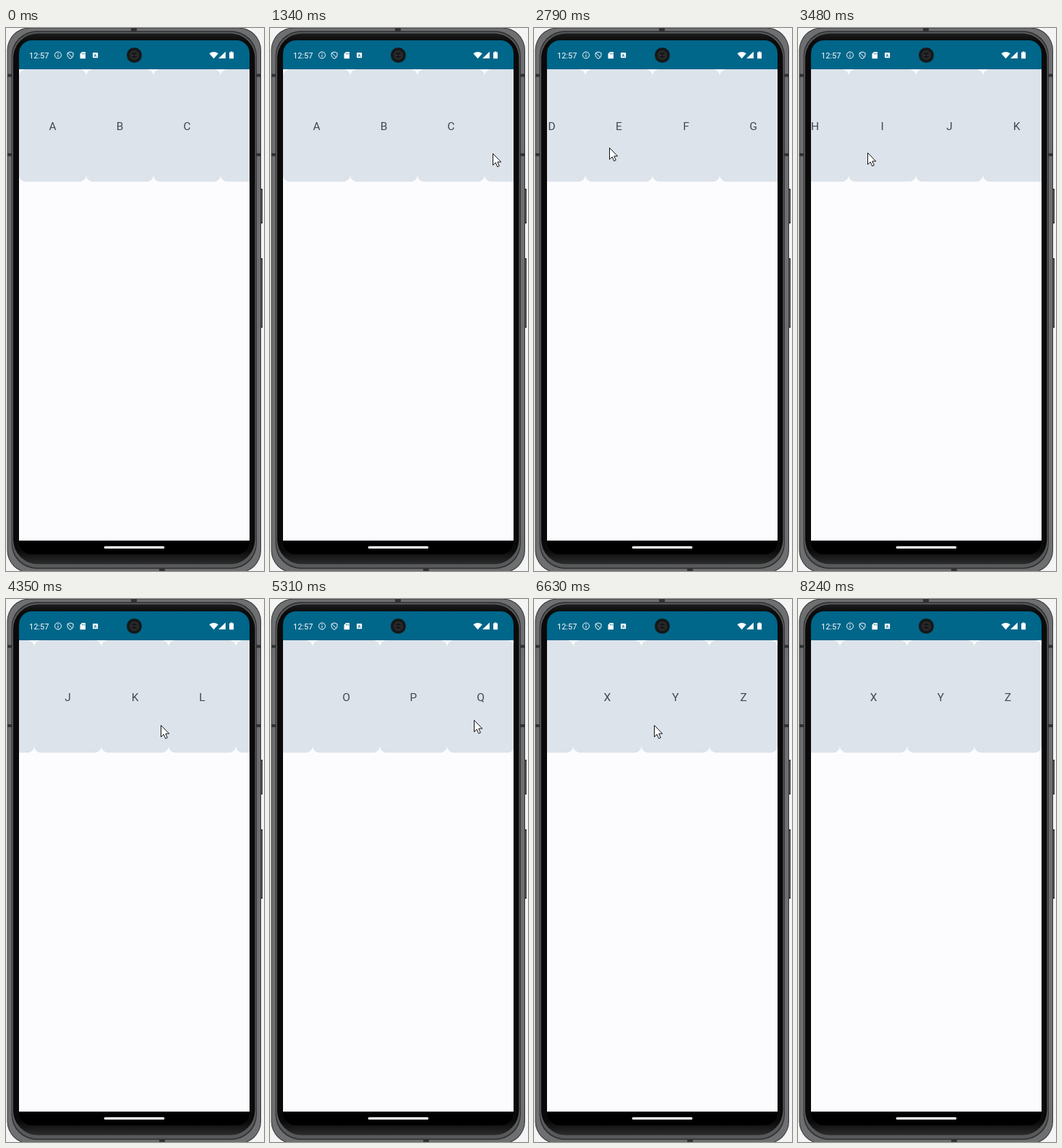
Animation, 357 px wide and 750 px high, one loop 9770 ms. Source, as an HTML page:

```html
<!DOCTYPE html>
<html lang="en">
<head>
<meta charset="utf-8">
<title>Letter carousel</title>
<style>
  html, body { margin: 0; width: 100%; height: 100%; overflow: hidden; background: #f4f4f4; }
  svg { display: block; width: 357px; height: 750px; }
  text { font-family: Roboto, sans-serif; }
  #cards rect { fill: #dce3ea; }
  #cards text { fill: #41484d; font-size: 15.5px; text-anchor: middle; }
</style>
</head>
<body>
<svg viewBox="0 0 357 750">
  <defs>
    <clipPath id="screen"><rect x="18" y="17" width="319" height="710" rx="18"/></clipPath>
    <linearGradient id="bezel" x2="0" y2="1">
      <stop offset="0" stop-color="#1c1c1c"/><stop offset=".015" stop-color="#0a0a0a"/>
      <stop offset=".975" stop-color="#0a0a0a"/><stop offset="1" stop-color="#2c2c2c"/>
    </linearGradient>
  </defs>

  <g id="phone">
    <path d="M352 222h3v48h-3zM352 318h3v96h-3z" fill="#353637"/>
    <path d="M353.5 224v44M353.5 320v92" stroke="#5b5c5d"/>
    <rect x="1.500" y="-.5" width="351.500" height="753" rx="31" fill="#333435"/>
    <rect x="2.500" y=".5" width="349.500" height="751" rx="30" fill="#6e6f70"/>
    <rect x="7.500" y="4" width="339.500" height="743" rx="35" fill="#303132"/>
    <rect x="8.500" y="5.500" width="337.500" height="740" rx="35" fill="#58595a"/>
    <rect x="10" y="7.500" width="334.500" height="733" rx="34" fill="url(#bezel)"/>
    <path d="M2 63.500h6v4h-6zM2 173h6v4h-6zM347 63.500h6v4h-6zM347 173h6v4h-6zM173 0h8v4h-8zM212 746h8v4h-8z" fill="#303132"/>
  </g>

  <g clip-path="url(#screen)">
    <path d="M18 17h319v710H18z"/>
    <path d="M18 57h319v651H18z" fill="#fcfcff"/>
    <g id="cards"></g>
    <path d="M18 17h319v40H18z" fill="#00668a"/>
    <rect x="135.700" y="715.700" width="83.600" height="3.400" rx="1.700" fill="#fff"/>
  </g>

  <g id="status" fill="#fff">
    <text x="32" y="41.500" font-size="11">12:57</text>
    <g fill="none" stroke="#fff">
      <circle cx="72" cy="37.500" r="4.500"/>
      <path d="M72 34.800v1.200M72 37v3.200"/>
      <path d="M89 33l4 1.500v3q0 3-4 5q-4-2-4-5v-3zM86 34.500l6 6.500"/>
    </g>
    <path d="M105 33h5v9.200h-7.500v-6.500z"/>
    <path d="M105.500 34.500v2M107.200 34.500v2M108.800 34.500v2" stroke="#00668a" stroke-width=".7"/>
    <rect x="120" y="34" width="7.200" height="7.200" rx=".7"/>
    <text x="123.600" y="39.900" font-size="6" font-weight="700" text-anchor="middle" fill="#00668a">A</text>
    <path d="M281.300 35.300q6.200-4.800 12.400 0L287.500 42.300z"/>
    <path d="M303.800 32.500v9.500h-9.800z"/>
    <path d="M309 33.500h1.700v-1h2.600v1h1.700v8.700h-6z"/>
  </g>

  <g id="camera">
    <circle cx="177.500" cy="37.500" r="10.500" fill="#161718"/>
    <circle cx="177.500" cy="37.500" r="6.500" fill="#2a2c2d"/>
    <circle cx="177.500" cy="37.500" r="4" fill="#17191a"/>
    <path d="M174.500 37.500h1.500M179 37.500h1.500" stroke="#5c6062"/>
  </g>

  <path id="cursor" d="M.5.500v16l3.700-3.500 2.500 5.700 2.600-1.100-2.500-5.600h4.900z" fill="#fff" stroke="#111"/>
</svg>

<script>
const LOOP = 9770, STEP = 60;
const LEFT = 18, RIGHT = 337, TOP = 57;
const CARD_W = 93, CARD_H = 155.2, RADIUS = 9.3;
const LETTERS = [...'ABCDEFGHIJKLMNOPQRSTUVWXYZ'];
const ROW_W = LETTERS.length * CARD_W;
const MAX_SCROLL = ROW_W - (RIGHT - LEFT);

const linear = u => u;
const drag = u => u ** 1.3;
const fling = u => 1 - (1 - u) ** 3;
const smooth = u => u * u * (3 - 2 * u);

// Rows: time, values, easing towards that row.
const scrollTrack = [
  [1800, [0]], [2100, [173], drag], [2790, [319], fling],
  [3040, [319]], [3270, [510], drag], [3960, [816], fling],
  [4700, [816]], [4920, [1010], drag], [5520, [1272], fling],
  [5700, [1470], drag], [6150, [1750], fling],
  [6190, [1750]], [6420, [1950], drag], [6540, [MAX_SCROLL], linear]
];
const stretchTrack = [
  [6540, [1]], [6600, [1.017], linear], [6630, [1.013], linear], [7140, [1], fling]
];
const cursorTrack = [
  [1160, [318, 179]], [1560, [291, 161], smooth],
  [1760, [291, 161]], [2100, [96, 161], drag], [2790, [104, 165], smooth],
  [3000, [296, 171], smooth], [3270, [95, 171], drag], [3840, [100, 174], smooth],
  [4350, [214, 174], drag], [4640, [300, 171], fling], [4920, [95, 166], drag],
  [5310, [282, 167], smooth], [5460, [300, 168], fling], [5700, [90, 170], drag],
  [6120, [295, 171], smooth], [6420, [90, 173], drag], [6630, [166, 174], drag],
  [7740, [303, 542], smooth], [7880, [303, 542]], [8240, [345, 750], drag]
];

function sample(track, t) {
  const next = track.findIndex(row => row[0] > t);
  if (next === 0) return track[0][1];
  if (next < 0) return track[track.length - 1][1];
  const [t0, from] = track[next - 1];
  const [t1, to, ease = linear] = track[next];
  const u = ease((t - t0) / (t1 - t0));
  return from.map((v, i) => v + (to[i] - v) * u);
}

function add(parent, tag, attrs) {
  const node = document.createElementNS('http://www.w3.org/2000/svg', tag);
  for (const key in attrs) node.setAttribute(key, attrs[key]);
  return parent.appendChild(node);
}

const cards = document.getElementById('cards');
const cursor = document.getElementById('cursor');
// A plain strip behind the cards closes the seams between them.
add(cards, 'rect', { x: LEFT, y: TOP + RADIUS, width: ROW_W, height: CARD_H - 2 * RADIUS });
LETTERS.forEach((letter, i) => {
  const x = LEFT + i * CARD_W;
  add(cards, 'rect', { x, y: TOP, width: CARD_W, height: CARD_H, rx: RADIUS });
  add(cards, 'text', { x: x + CARD_W / 2, y: 141.2 }).textContent = letter;
});

function render(time) {
  const base = time < 2730 ? 2100 : 2730;
  const t = base + Math.floor((time - base) / STEP) * STEP;
  const scroll = Math.round(sample(scrollTrack, t)[0]);
  const [stretch] = sample(stretchTrack, t);
  const [x, y] = sample(cursorTrack, t).map(Math.round);
  cards.setAttribute('transform',
    `translate(${RIGHT} 0) scale(${stretch} 1) translate(${-RIGHT - scroll} 0)`);
  cursor.setAttribute('transform', `translate(${x} ${y})`);
  cursor.style.display = time >= 1160 && time < 8240 ? '' : 'none';
}

const start = performance.now();
function tick() {
  render((performance.now() - start) % LOOP);
  requestAnimationFrame(tick);
}
tick();
</script>
</body>
</html>
```
